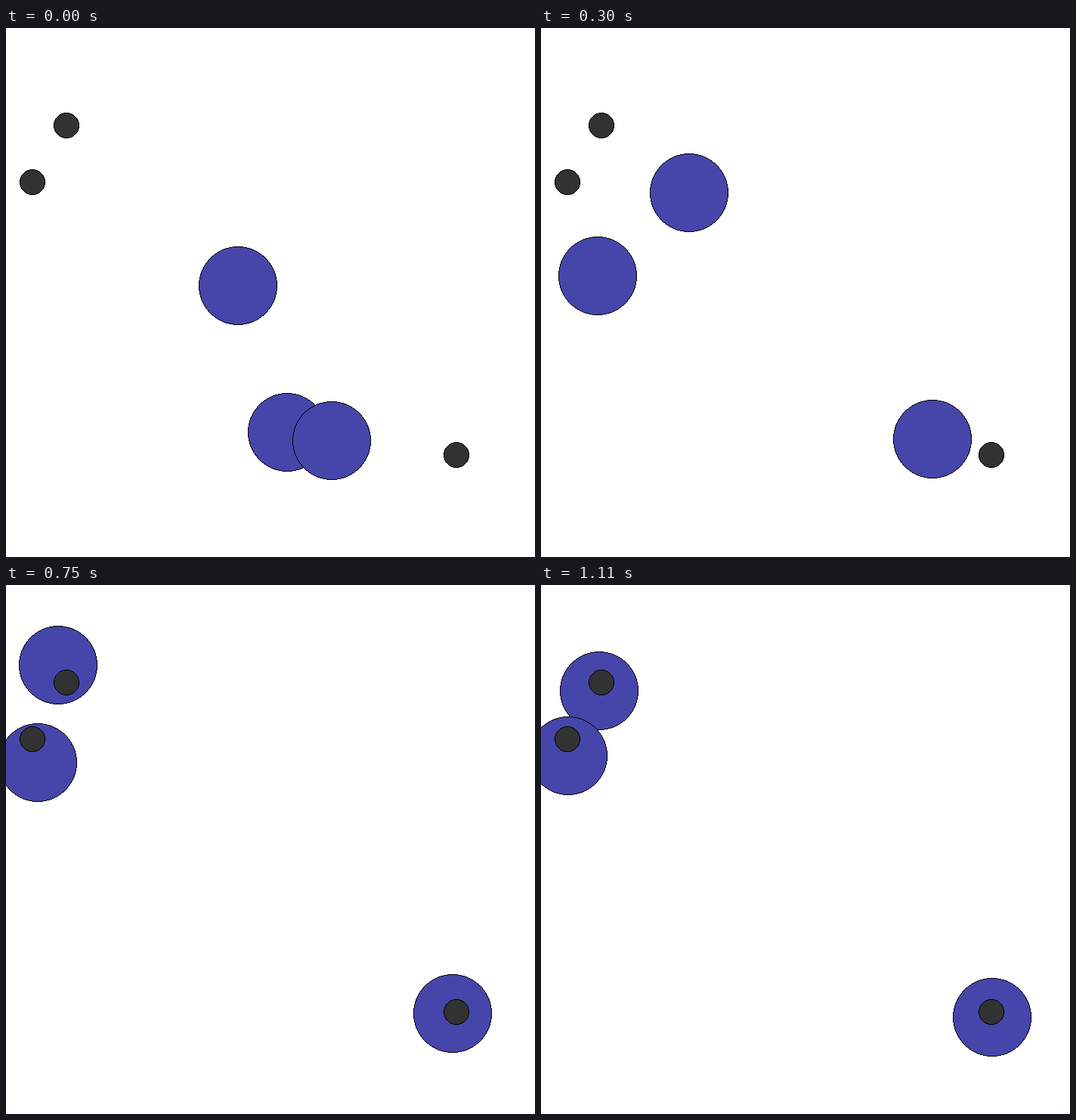
An HTML page with a canvas that plays this animation: 700x700 px, repeating every 1170 ms.

```html
<!DOCTYPE html>
<html>
<head>
<meta charset="utf-8">
<style>
  html, body { margin: 0; height: 100%; overflow: hidden; background: #fff; }
  canvas { display: block; }
</style>
</head>
<body>
<canvas width="700" height="700"></canvas>
<script>
const LOOP = 1170, STEPS_PER_KEY = 4;
const ctx = document.querySelector('canvas').getContext('2d');

const dots = [[80, 129], [35, 204], [596, 565]];

// Key points of each disc, evenly spaced in time
const paths = [
  [[307, 341], [253, 269], [136, 170], [62, 125], [69, 106], [86, 135], [77, 140]],
  [[372, 535], [140, 419], [39, 247], [45, 215], [42, 235], [48, 227], [36, 226]],
  [[431, 546], [508, 564], [525, 525], [575, 557], [591, 567], [596, 560], [597, 572]]
];

// Two steps per 90 ms, 30 and 60 ms long; the first pose is held for both.
function stepAt(t) {
  return Math.max(0, 2 * Math.floor(t / 90) + (t % 90 >= 30 ? 1 : 0) - 1);
}

// Catmull-Rom curve through the key points
function pointAt(path, pos) {
  const i = Math.floor(pos), u = pos - i;
  const key = k => path[Math.min(path.length - 1, Math.max(0, k))];
  return [0, 1].map(axis => {
    const [a, b, c, d] = [-1, 0, 1, 2].map(k => key(i + k)[axis]);
    return Math.round(b + u / 2 * (c - a + u * (2 * a - 5 * b + 4 * c - d + u * (3 * (b - c) + d - a))));
  });
}

// Circle without smoothing, outlined one pixel wide
function circle([x, y], r, color) {
  const edge = [];
  for (let a = 0.5, b = r; a <= b; a++) {
    b = Math.floor(Math.sqrt(r * r - a * a)) + 0.5;
    edge.push([a, b], [b, a]);
  }
  ctx.fillStyle = color;
  for (const [dx, dy] of edge)
    for (const s of [-1, 1])
      ctx.fillRect(x - dx - 0.5, y + s * dy - 0.5, 2 * dx + 1, 1);
  ctx.fillStyle = '#000';
  for (const [dx, dy] of edge)
    for (const sx of [-1, 1])
      for (const sy of [-1, 1])
        ctx.fillRect(x + sx * dx - 0.5, y + sy * dy - 0.5, 1, 1);
}

function draw() {
  const pos = stepAt(performance.now() % LOOP) / STEPS_PER_KEY;
  ctx.clearRect(0, 0, 700, 700);
  paths.forEach(path => circle(pointAt(path, pos), 51.5, '#4646aa'));
  dots.forEach(dot => circle(dot, 16.5, '#323232'));
  requestAnimationFrame(draw);
}
draw();
</script>
</body>
</html>
```
